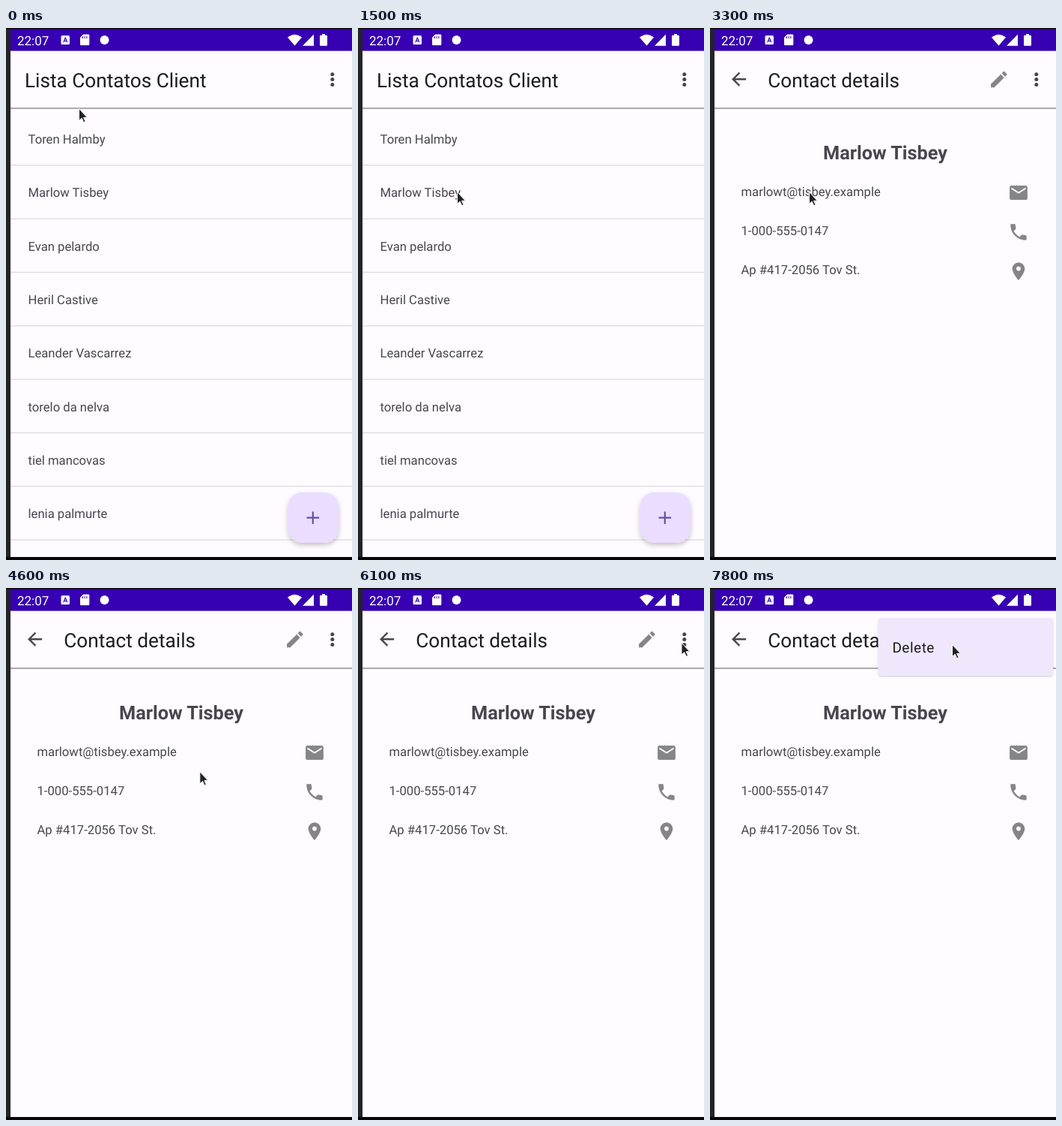
Recreate the animation shown at these times as an HTML page. Size 462 by 709 pixels, loop 8 s.

```html
<!DOCTYPE html>
<html lang="en">
<head>
<meta charset="utf-8">
<title>Contacts</title>
<style>
  html, body { margin: 0; width: 100%; height: 100%; overflow: hidden; background: #fffbfe; }
  svg { display: block; width: 100vw; height: 100vh; font-family: Roboto, sans-serif; text-rendering: geometricPrecision; }
  .title { font-size: 26.2px; fill: #1c1b1f; }
  .body { font-size: 16.66px; fill: #49454f; }
  .name { font-size: 25.3px; font-weight: 700; fill: #49454f; text-anchor: middle; }
  .item { font-size: 19px; letter-spacing: .5px; fill: #1c1b1f; }
  .gray { fill: #878487; }
</style>
</head>
<body>
<svg viewBox="0 0 462 709" preserveAspectRatio="none">
  <defs>
    <filter id="fabShadow" x="-30%" y="-30%" width="160%" height="170%">
      <feDropShadow dx="0" dy="3" stdDeviation="3" flood-opacity=".24"/>
    </filter>
    <filter id="menuShadow" x="-5%" y="-10%" width="110%" height="125%">
      <feDropShadow dx="0" dy="1" stdDeviation="1.2" flood-opacity=".2"/>
    </filter>
    <clipPath id="menuClip"><rect id="menuClipBox" y="36" height="84"/></clipPath>
    <clipPath id="screen"><rect x="6" width="456" height="705"/></clipPath>
  </defs>

  <rect width="462" height="709" fill="#fffbfe"/>

  <g id="list">
    <text class="title" x="25" y="78.5">Lista Contatos Client</text>
    <g id="rows"></g>
    <rect x="376.5" y="619" width="67.5" height="67" rx="19" fill="#eaddff" filter="url(#fabShadow)"/>
    <path d="M401.5 652.7h16.6M409.8 644.4v16.6" stroke="#6750a4" stroke-width="2.2"/>
  </g>

  <g id="details">
    <path fill="#49454f" transform="translate(24.3 54) scale(1.19)" d="M20 11H7.83l5.59-5.59L12 4l-8 8 8 8 1.41-1.41L7.83 13H20v-2z"/>
    <text class="title" x="77.3" y="78.5">Contact details</text>
    <path class="gray" transform="translate(371.5 54.3) scale(1.19)" d="M3 17.25V21h3.75L17.81 9.94l-3.75-3.75L3 17.25zM20.71 7.04c.39-.39.39-1.02 0-1.41l-2.34-2.34c-.39-.39-1.02-.39-1.41 0l-1.83 1.83 3.75 3.75 1.83-1.83z"/>
    <g id="contact">
      <text class="name" x="234" y="175.3">Marlow Tisbey</text>
      <text class="body" x="41.5" y="223.7">marlowt@tisbey.example</text>
      <text class="body" x="41.5" y="276">1-000-555-0147</text>
      <text class="body" x="41.5" y="328.3">Ap #417-2056 Tov St.</text>
      <g class="gray">
        <path transform="translate(397.7 205.3) scale(1.19)" d="M20 4H4c-1.1 0-1.99.9-1.99 2L2 18c0 1.1.9 2 2 2h16c1.1 0 2-.9 2-2V6c0-1.1-.9-2-2-2zm0 4l-8 5-8-5V6l8 5 8-5v2z"/>
        <path transform="translate(397.7 257.7) scale(1.19)" d="M6.62 10.79c1.44 2.83 3.76 5.14 6.59 6.59l2.2-2.2c.27-.27.67-.36 1.02-.24 1.12.37 2.33.57 3.57.57.55 0 1 .45 1 1V20c0 .55-.45 1-1 1-9.39 0-17-7.61-17-17 0-.55.45-1 1-1h3.5c.55 0 1 .45 1 1 0 1.25.2 2.45.57 3.57.11.35.03.74-.25 1.02l-2.2 2.2z"/>
        <path transform="translate(397.7 310) scale(1.19)" d="M12 2C8.13 2 5 5.13 5 9c0 5.25 7 13 7 13s7-7.75 7-13c0-3.87-3.13-7-7-7zm0 9.5c-1.38 0-2.5-1.12-2.5-2.5s1.12-2.5 2.5-2.5 2.5 1.12 2.5 2.5-1.12 2.5-2.5 2.5z"/>
      </g>
    </g>
    <g id="progress">
      <rect x="6" y="107" width="456" height="5" fill="#e5dfee"/>
      <rect id="bar1" y="107" height="5" fill="#6200ee"/>
      <rect id="bar2" y="107" height="5" fill="#6200ee"/>
    </g>
  </g>

  <rect x="6" y="106.3" width="456" height="1.4" fill="#8a868a"/>
  <circle id="ripple" cx="436" cy="68.5" fill="#1c1b1f" fill-opacity=".08"/>
  <g fill="#49454f">
    <circle cx="435.8" cy="61.8" r="2.5"/>
    <circle cx="435.8" cy="68.6" r="2.5"/>
    <circle cx="435.8" cy="75.4" r="2.5"/>
  </g>

  <g id="menu">
    <rect id="shade" y="40" fill="#8a7f95" fill-opacity=".12"/>
    <rect id="panel" y="40" rx="4" fill="#f1e7fc" filter="url(#menuShadow)"/>
    <g clip-path="url(#menuClip)"><text id="menuText" class="item">Delete</text></g>
  </g>

  <g clip-path="url(#screen)">
    <rect width="462" height="30.5" fill="#3700b3"/>
    <text x="15" y="22.6" font-size="17" fill="#fff">22:07</text>
    <g fill="#fff">
      <rect x="73.5" y="10" width="11.5" height="12" rx="1.5"/>
      <path d="M103 8.5h7q1.3 0 1.3 1.3v12q0 1.3-1.3 1.3h-9.7q-1.3 0-1.3-1.3v-9z"/>
      <circle cx="131.5" cy="16" r="6"/>
      <path d="M376 12.6q9.5-7.6 19 0l-9.5 11z"/>
      <path d="M396 23.7L411 8.5v15.2z"/>
      <path d="M422 8h4v1.8h2q1 0 1 1v12q0 1-1 1h-8q-1 0-1-1v-12q0-1 1-1h2z"/>
    </g>
    <text x="79.3" y="19.3" font-size="9" font-weight="700" fill="#3700b3" text-anchor="middle">A</text>
    <path d="M102.5 11v3M105.2 11v3M107.9 11v3" stroke="#3700b3"/>
  </g>
  <rect width="6" height="709" fill="#242426"/>
  <rect width="462" height="1.5" fill="#111"/>
  <rect y="705" width="462" height="4" fill="#060606"/>

  <path id="cursor" fill="#222" stroke="#fff" stroke-linejoin="round" d="M.5.5V16.5l3.7-3.3 2.5 5.6 2.4-1.1-2.5-5.4h4.9z"/>
</svg>

<script>
const LOOP = 8000, STEP = 100;
const $ = id => document.getElementById(id);
const set = (id, attrs) => { for (const k in attrs) $(id).setAttribute(k, attrs[k]); };
const show = (id, on) => set(id, { display: on ? "inline" : "none" });
const clamp = v => Math.min(1, Math.max(0, v));

const people = ["Toren Halmby", "Marlow Tisbey", "Evan pelardo", "Heril Castive",
  "Leander Vascarrez", "torelo da nelva", "tiel mancovas", "lenia palmurte"];
$("rows").innerHTML = people.map((name, i) => {
  const y = i * 71.3;
  return `<text class="body" x="29.5" y="${154 + y}">${name}</text>
    <rect x="6" y="${182.4 + y}" width="456" height="1.2" fill="#dcd8dc"/>`;
}).join("");

// Pointer stops: time, x, y
const stops = [
  [300, 97, 107], [500, 72, 150], [700, 22, 232], [800, 14, 270], [900, 32, 290],
  [1100, 102, 268], [1200, 119, 253], [1500, 132, 218],
  [4200, 132, 218], [4500, 215, 238], [4800, 345, 257], [5000, 396, 250], [5100, 402, 246],
  [5300, 399, 318], [5400, 400, 334], [5500, 404, 318], [5800, 421, 150], [6000, 427, 82],
  [6200, 436, 63], [7200, 436, 63], [7300, 445, 86], [7400, 432, 106],
  [7600, 366, 92], [7700, 334, 79], [7800, 323, 75]
];

function pointer(t) {
  if (t <= stops[0][0]) return stops[0].slice(1);
  const i = stops.findIndex(s => s[0] >= t);
  if (i < 0) return stops[stops.length - 1].slice(1);
  const [t0, x0, y0] = stops[i - 1], [t1, x1, y1] = stops[i];
  const k = (t - t0) / (t1 - t0);
  return [x0 + (x1 - x0) * k, y0 + (y1 - y0) * k];
}

// Cubic timing curve, solved by bisection
function bezier(x1, y1, x2, y2, x) {
  const at = (a, b, u) => 3 * a * u * (1 - u) ** 2 + 3 * b * u * u * (1 - u) + u ** 3;
  let lo = 0, hi = 1;
  for (let i = 0; i < 20; i++) {
    const mid = (lo + hi) / 2;
    if (at(x1, x2, mid) < x) lo = mid; else hi = mid;
  }
  return at(y1, y2, lo);
}

function setBar(id, tail, head) {
  set(id, { x: 6 + 456 * tail, width: 456 * Math.max(0, head - tail) });
}

function drawProgress(ms) {
  const phase = (delay, length) => clamp((ms - delay) / length);
  setBar("bar1", bezier(.4, 0, 1, 1, phase(333, 850)), bezier(.2, 0, .8, 1, phase(0, 750)));
  setBar("bar2", bezier(.1, 0, .45, 1, phase(1267, 533)), bezier(0, 0, .65, 1, phase(1000, 567)));
}

// The menu unfolds from the top right corner: a faint shade first, then the panel
function drawMenu(t) {
  const p = clamp((t - 6600) / 400), rest = 1 - p * p * (3 - 2 * p);
  const x = 224.5 + 239 * rest, width = 458 + 5 * rest - x, height = 77 - 40 * rest;
  show("menu", p > 0);
  set("shade", { x, width, height, opacity: p < 1 ? 1 : 0 });
  set("panel", { x, width, height, opacity: clamp(2 * p - 1) });
  set("menuClipBox", { x, width });
  set("menuText", { x: 243.4 + 120 * rest, y: 86 - 20 * rest, opacity: p ** 1.7 });
}

function draw(time) {
  const t = Math.floor(time % LOOP / STEP) * STEP;
  const inDetails = t >= 2700, loading = inDetails && t < 3300;
  show("list", !inDetails);
  show("details", inDetails);
  show("contact", t >= 3300);
  show("progress", loading);
  if (loading) drawProgress(t - 2700 + 400);
  show("ripple", t >= 6600 && t < 7000);
  set("ripple", { r: 17 + 7 * clamp((t - 6600) / 200) });
  drawMenu(t);
  set("cursor", { transform: `translate(${pointer(t).join(" ")})` });
}

const start = performance.now();
function tick() {
  draw(performance.now() - start);
  requestAnimationFrame(tick);
}
draw(0);
requestAnimationFrame(tick);
</script>
</body>
</html>
```
